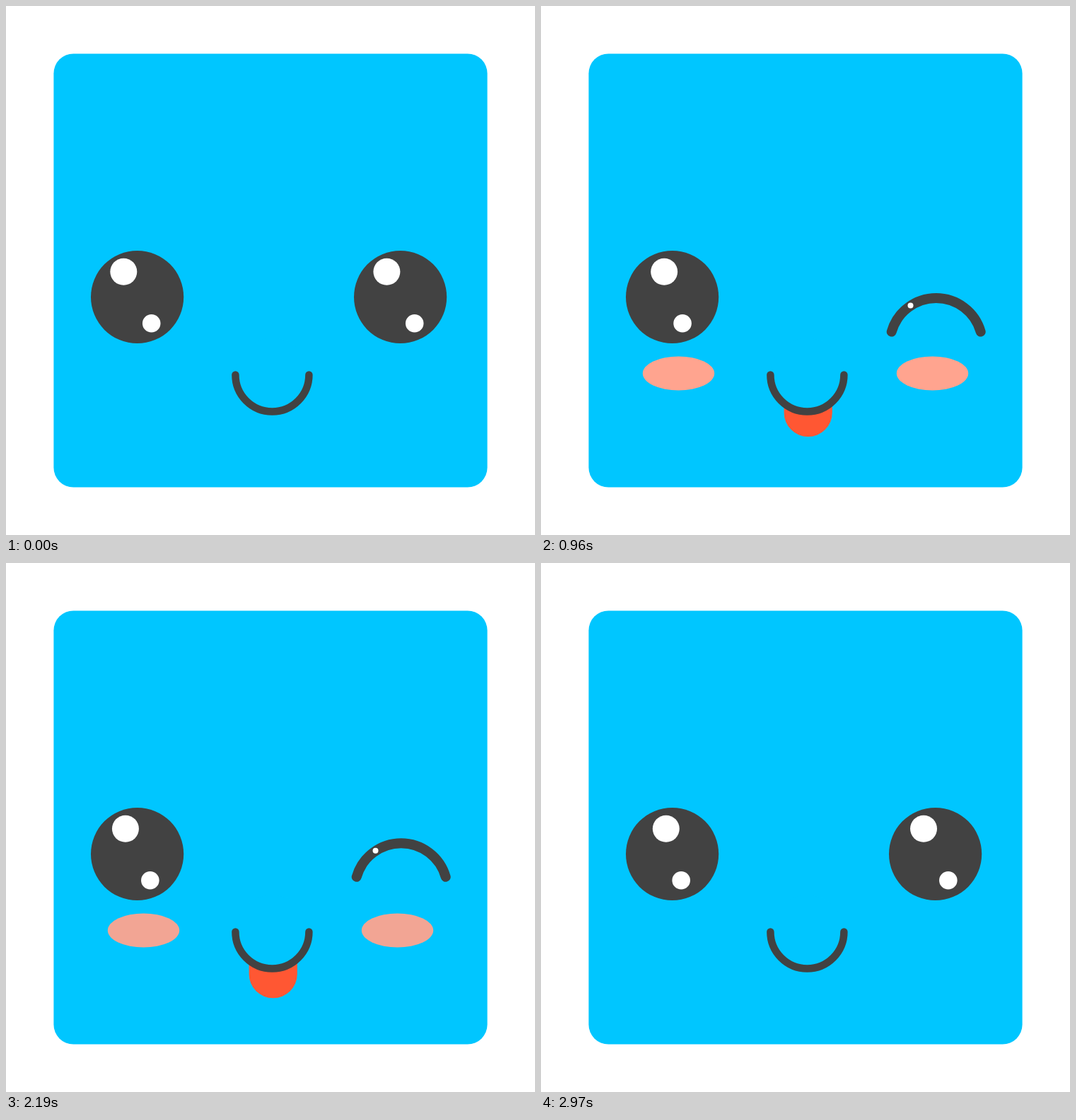
Animation of 748 by 748 pixels, one loop 3 s. Source, as an HTML page without scripts:

```html
<!DOCTYPE html>
<html lang="en">
<head>
<meta charset="utf-8">
<title>Winking face</title>
<style>
  /* --k counts 100 ticks of 30 ms; every pose is a formula of it */
  @property --k { syntax: "<number>"; inherits: true; initial-value: 0; }
  @keyframes tick { from { --k: 0; } to { --k: 100; } }

  html, body { margin: 0; width: 100%; height: 100%; overflow: hidden; background: #fff; }

  svg {
    display: block;
    width: 748px;
    height: 748px;
    animation: tick 3s steps(100) infinite;

    --shut: calc(clamp(0, var(--k) - 17, 1) - clamp(0, var(--k) - 78, 1));
    --lid: calc((cos(180deg * clamp(0, (var(--k) - 70) / 9, 1)) - cos(180deg * clamp(0, (var(--k) - 18) / 8, 1))) / 2);
    --glow: calc((cos(180deg * clamp(0, (var(--k) - 72) / 7, 1)) - cos(180deg * clamp(0, (var(--k) - 23) / 9, 1))) / 2);
    --out: calc((cos(180deg * clamp(0, (var(--k) - 71) / 8, 1)) - cos(180deg * clamp(0, (var(--k) - 26) / 9, 1))) / 2);
    --arc: calc(124 + 13 * clamp(0, var(--k) - 18, 2));
  }

  .skin { fill: #00c6ff; }
  .ink { fill: #424242; }
  .line { fill: none; stroke: #424242; stroke-linecap: round; }
  .shine { fill: #fff; }

  .eye { --sway: calc((1 - cos(var(--k) * 60deg)) / 2); }
  .right {
    --sway: calc((1 - cos((var(--k) - clamp(0, var(--k) - 40, 2)) * 60deg)) / 2);
    opacity: calc(1 - var(--shut));
  }
  .big { transform: translateX(calc(10.5px * var(--sway))); }
  .small { transform: translateX(calc(-7.5px * var(--sway))); }

  .wink {
    opacity: var(--shut);
    transform: translateY(calc(-67px * (1 - var(--lid))));
  }
  .lash {
    stroke-width: 14;
    stroke-dasharray: calc(var(--arc) * 1px) 400px;
    stroke-dashoffset: calc((var(--arc) - 148) * .5px);
  }
  .blush { fill: #ffa48f; opacity: var(--glow); }
  .tongue { fill: #ff5733; transform: translateY(calc(-60px * (1 - var(--out)))); }
</style>
</head>
<body>
<svg viewBox="0 0 748 748">
  <rect class="skin" x="67.4" y="67.4" width="613.2" height="613.2" rx="28"/>

  <g class="blush">
    <ellipse cx="194.5" cy="519.5" rx="50.7" ry="24"/>
    <ellipse cx="553.5" cy="519.5" rx="50.7" ry="24"/>
  </g>

  <g class="eye">
    <circle class="ink" cx="185.6" cy="411.5" r="65.6"/>
    <circle class="shine big" cx="166.3" cy="375.7" r="19"/>
    <circle class="shine small" cx="205.7" cy="448.7" r="12.8"/>
  </g>

  <g class="eye right">
    <circle class="ink" cx="557.6" cy="411.5" r="65.6"/>
    <circle class="shine big" cx="538.4" cy="375.7" r="19"/>
    <circle class="shine small" cx="577.7" cy="448.7" r="12.8"/>
  </g>

  <g class="wink">
    <path class="line lash" pathLength="148" d="M495.7 460.6A65.5 65.5 0 0 1 621.7 460.6"/>
    <circle class="shine" cx="522.5" cy="423.5" r="4"/>
  </g>

  <path class="tongue" d="M343.6 558H411.8V590A34.1 34.1 0 0 1 343.6 590Z"/>
  <circle class="skin" cx="376.4" cy="521.5" r="52"/>
  <path class="line" stroke-width="10.5" d="M324.4 521.5A52 52 0 0 0 428.4 521.5"/>
</svg>
</body>
</html>
```
